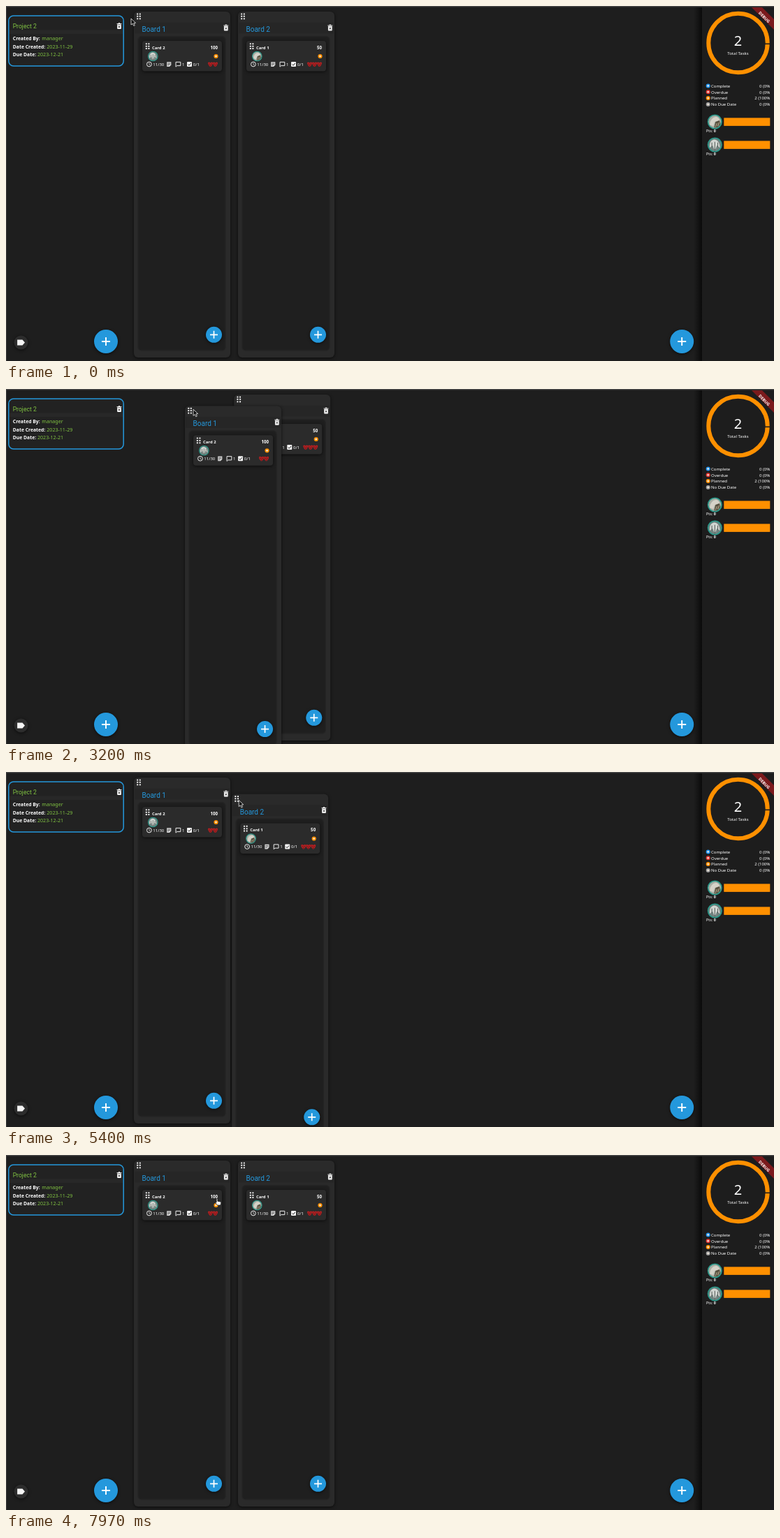
Recreate the animation shown at these times as an HTML page. Size 1099x509 px, loop 8 s.

```html
<!DOCTYPE html>
<html lang="en">
<head>
<meta charset="utf-8">
<title>Project board</title>
<style>
  html, body { margin: 0; width: 100%; height: 100%; overflow: hidden; background: #1e1e1e; }
  svg { display: block; width: 100vw; height: 100vh; }
  text { font-family: "Noto Sans", "Open Sans", sans-serif; fill: #fff; font-size: 6px; white-space: pre; }
  .head { font-family: Roboto, sans-serif; }
  .bold { font-weight: 700; }
  .shadow { filter: drop-shadow(0 1px 2px rgba(0, 0, 0, .65)); }
</style>
</head>
<body>
<svg id="stage" viewBox="0 0 1099 509" preserveAspectRatio="none"></svg>
<script>
const LOOP = 8000, SLOT = 149;
const BLUE = '#2498dc', ORANGE = '#ff9000', GREEN = '#80c342';
const stage = document.getElementById('stage');

const rect = (x, y, w, h, fill, extra = '') =>
  `<rect x="${x}" y="${y}" width="${w}" height="${h}" fill="${fill}" ${extra}/>`;
const circle = (x, y, r, fill, extra = '') =>
  `<circle cx="${x}" cy="${y}" r="${r}" fill="${fill}" ${extra}/>`;
const path = (d, fill, extra = '') => `<path d="${d}" fill="${fill}" ${extra}/>`;
const line = (d, color, width) => path(d, 'none', `stroke="${color}" stroke-width="${width}"`);
const text = (x, y, value, size = 6, extra = '') =>
  `<text x="${x}" y="${y}" style="font-size:${size}px" ${extra}>${value}</text>`;
const at = (x, y, content, extra = '') =>
  `<g transform="translate(${x} ${y})" ${extra}>${content}</g>`;

const grip = (x, y) => [0, 1, 2, 3, 4, 5].map(i =>
  rect(x + i % 2 * 3.6, y + (i >> 1) * 3.4, 2, 2, '#f4f4f4', 'rx=".5"')).join('');

const trash = (x, y) => at(x, y,
  path('M-3.4-3.8h2l.7-.8h1.4l.7.8h2v1.1h-6.8zM-2.9-2.1h5.8v5.4q0 1-1 1h-3.8q-1 0-1-1z', '#f4f4f4') +
  line('M-1.2-.3L1.2 2.3M1.2-.3L-1.2 2.3', '#222', .8));

const addButton = (x, y, r, arm, width) => at(x, y,
  circle(0, 0, r, BLUE) + line(`M${-arm} 0H${arm}M0 ${-arm}V${arm}`, '#fff', width), 'class="shadow"');

const statusDot = (x, y, color, r = 3) =>
  circle(x, y, r, color) + circle(x, y, r * .43, '#f3e9dc');

const photos = {
  shell: circle(0, 0, 9, '#a9aea5') +
    path('M-7 4Q-6-6 2-7Q7-5 6-1L0 0L-2 6Z', '#d5d2c8') +
    path('M-1 8L1 0L6-2L8 3L4 8Z', '#57503f') +
    line('M1 7L3 2M4 6L6 1', '#b8ac91', 1),
  tree: circle(0, 0, 9, '#72827f') +
    path('M-7 4Q-8-5-2-7Q6-8 7 4L3 1L1 6H-1L-3 1Z', '#d3d7d3') +
    line('M0 8V-4M-4 3V-3M4 3V-3', '#59605c', 1)
};
const avatar = (x, y, r, photo) =>
  at(x, y, `<g transform="scale(${r / 10})">${photos[photo]}` +
    circle(0, 0, 9.3, 'none', 'stroke="#299b8c" stroke-width="1.5"') + '</g>');

const redMark = x => at(x, 83.5,
  path('M-3.5-2.2Q-2-4 0-2Q2-4 3.5-2.2Q3.8 0 2 2L.9 3.6H-.9L-2 2Q-3.8 0-3.5-2.2Z', '#b52022') +
  line('M-2-.7L-.5.2M2-.7L.5.2M-1 2.2H1', '#3d1718', .8));

function card(name, points, photo, marks) {
  const white = '#eee';
  return `<g class="shadow">${rect(195, 50, 114, 43.5, '#2b2b2b', 'rx="4"')}</g>` +
    grip(199.8, 53.3) +
    text(209, 61.8, name, 5.9, 'class="bold"') +
    text(303, 61.8, points, 6.2, 'class="bold" text-anchor="end"') +
    avatar(210.3, 72, 7.3, photo) + statusDot(300.5, 72, ORANGE, 3.1) +
    circle(204.9, 83.5, 3.4, 'none', `stroke="${white}"`) +
    line('M204.9 81.5V83.7L206.4 84.6', white, .8) +
    text(210.3, 85.8, '11/30') +
    path('M230.2 80.2H236.3V84.5L234 87H230.2Z', '#ddd') +
    line('M231.2 82H235.3M231.2 83.5H235.3M231.2 85H233.4', '#2b2b2b', .6) +
    path('M243 80.4H249.8V85.6H244.7L243 87.2Z', 'none', `stroke="${white}"`) +
    text(252, 85.8, '1') +
    rect(259, 80, 7, 7, '#f4f4f4', 'rx="1"') + line('M260.4 83.6L262 85.2L264.8 82', '#222', 1) +
    text(267.8, 85.8, '0/1') +
    Array.from({ length: marks }, (_, i) => redMark(299.5 - i * 7)).join('');
}

const board = (id, title, content) => `<g id="${id}">
  <g class="shadow">${rect(183, 8, 138, 496, '#2a2a2a', 'rx="6"')}</g>
  ${rect(184, 23.5, 136, 16, '#262626')}
  ${grip(187.2, 10.4)}
  ${text(194.5, 37, title, 10, `class="head" fill="${BLUE}" style="fill:${BLUE};font-size:10px"`)
    .replace('style="font-size:10px" ', '')}
  ${trash(314.8, 31.2)}
  ${rect(189, 43.5, 125, 450.5, '#1f1f1f', 'rx="5" stroke="#242424" stroke-width="1.5"')}
  ${content}${addButton(297.5, 471.3, 11.5, 5.5, 1.7)}</g>`;

const tinted = (x, y, value, size, color, cls = '') =>
  `<text x="${x}" y="${y}" class="${cls}" style="fill:${color};font-size:${size}px">${value}</text>`;

function project() {
  const rows = [['Created By:', 'manager', 51.3], ['Date Created:', '2023-11-29', 58.3], ['Due Date:', '2023-12-21', 45]];
  return rect(3.8, 14, 164.4, 72, '#222', `rx="7" stroke="${BLUE}" stroke-width="1.5"`) +
    rect(5, 34.5, 162, 5.5, '#282828') +
    tinted(9.7, 32, 'Project 2', 8.6, GREEN, 'head') + trash(162, 28.7) +
    rows.map(([label, value, x], i) => text(9.8, 49.2 + i * 11.5, label, 6.8, 'class="bold"') +
      tinted(x, 49.2 + i * 11.5, value, 7.1, GREEN)).join('');
}

function sidebar() {
  const legend = [['Complete', '0 (0%', '#2196f3'], ['Overdue', '0 (0%', '#e53935'],
    ['Planned', '2 (100%', ORANGE], ['No Due Date', '0 (0%', '#9e9e9e']];
  const member = (y, photo) => avatar(1014.3, y, 10.5, photo) +
    rect(1027.3, y - 5.6, 66, 11.5, ORANGE) +
    text(1002, y + 15.4, 'Pts: <tspan class="bold">0</tspan>', 5.4);
  return rect(984, 2, 12, 507, 'url(#edge)') + rect(996, 2, 103, 507, '#1d1d1d') +
    circle(1047.5, 53, 42.2, 'none', `stroke="${ORANGE}" stroke-width="6"`) +
    line('M1085.5 54.3H1094', '#1d1d1d', 1.6) +
    text(1047.5, 57, '2', 20, 'text-anchor="middle"') +
    text(1047.5, 70.4, 'Total Tasks', 6, 'text-anchor="middle"') +
    legend.map(([label, value, color], i) => {
      const y = 114.4 + i * 8.85;
      return statusDot(1004.7, y, color) + text(1009, y + 2.3, label) +
        text(1093.3, y + 2.3, value, 6, 'text-anchor="end"');
    }).join('') +
    member(166, 'shell') + member(199, 'tree') +
    path('M1067 2H1082L1099 19V34Z', '#7b1a1c') +
    `<g transform="translate(1085 16) rotate(45)">${text(0, 2, 'DEBUG', 5.8, 'class="bold" text-anchor="middle"')}</g>`;
}

stage.innerHTML = `<defs><linearGradient id="edge">
    <stop offset="0" stop-color="#000" stop-opacity="0"/><stop offset="1" stop-color="#000" stop-opacity=".65"/>
  </linearGradient></defs>` +
  rect(0, 0, 1099, 509, '#1e1e1e') + project() +
  at(21.5, 482.5, circle(0, 0, 10, '#2c2c2c') +
    path('M-5.4-4H2L5.5 0L2 4H-5.4Z', '#f4f4f4', 'stroke-linejoin="round"'), 'class="shadow"') +
  addButton(143, 481, 17, 6, 1.9) + addButton(967.2, 481, 17, 6, 1.9) +
  `<g id="boards">${board('second', 'Board 2', card('Card 1', '50', 'shell', 3))}` +
  `${board('first', 'Board 1', card('Card 2', '100', 'tree', 2))}</g>` +
  sidebar() +
  rect(0, 0, 1099, 1.3, '#4a4a4a') + rect(0, 0, .8, 509, '#444') +
  `<g id="cursor">
    <path id="arrow" d="M0 0V9L2.2 7.2L3.7 10.4L5.3 9.7L3.8 6.5L6.6 6.3Z" fill="#111" stroke="#eee" stroke-width=".8"/>
    <path id="hand" d="M-.9.8Q0-.5.9.8V4.2L4.8 5Q6 5.4 5.8 6.8L5 10H.5L-2.3 6.6Q-2.5 5.3-.9 6Z"
      fill="#f5f5f5" stroke="#111" stroke-width=".7"/></g>`;

const byId = id => document.getElementById(id);
const boards = byId('boards'), first = byId('first'), second = byId('second');
const cursor = byId('cursor'), arrow = byId('arrow'), hand = byId('hand');

const mix = (a, b, p) => a + (b - a) * p;
function ease(t, start, end) {
  const p = Math.min(1, Math.max(0, (t - start) / (end - start)));
  return p * p * (3 - 2 * p);
}

// Pointer stops: time, x, y
const stops = [[0, 179, 18], [30, 179, 18], [1180, 208, 50], [1280, 208, 50], [2530, 195, 13], [2700, 195, 13],
  [3650, 330, 43], [4200, 330, 43], [4630, 193, 17], [4830, 193, 17], [5500, 342, 42],
  [5950, 453, 78], [6770, 453, 78], [7960, 302, 62], [LOOP, 302, 62]];

function pointer(t) {
  const i = Math.max(1, stops.findIndex(s => s[0] >= t));
  const [t0, x0, y0] = stops[i - 1], [t1, x1, y1] = stops[i];
  const p = ease(t, t0, t1);
  return [mix(x0, x1, p), mix(y0, y1, p)];
}

// Follows the pointer while held, then settles into the right slot.
function carried(t, start, end) {
  const from = pointer(start), now = pointer(Math.min(end, Math.max(start, t)));
  const settle = ease(t, end, end + 150);
  return [mix(now[0] - from[0], SLOT, settle), mix(now[1] - from[1], 0, settle)];
}

const place = (el, [x, y]) => el.setAttribute('transform', `translate(${x.toFixed(2)} ${y.toFixed(2)})`);

function render(t) {
  const early = t < 4500;
  const [start, end] = early ? [2700, 3650] : [4830, 5500];
  const held = early ? first : second, other = early ? second : first;
  const middle = (start + end) / 2;
  place(held, carried(t, start, end));
  place(other, [SLOT * (1 - ease(t, middle, middle + 220)), 0]);
  if (boards.lastElementChild !== held) boards.append(held);

  const [x, y] = pointer(t);
  const dragging = t > start && t < end;
  const overCard = !dragging && y > 52 && y < 94 && (x > 195 && x < 309 || x > 344 && x < 458);
  place(cursor, [x, y]);
  arrow.style.display = overCard ? 'none' : '';
  hand.style.display = overCard ? '' : 'none';
}

const began = performance.now();
function tick() {
  render((performance.now() - began) % LOOP);
  requestAnimationFrame(tick);
}
render(0);
tick();
</script>
</body>
</html>
```
